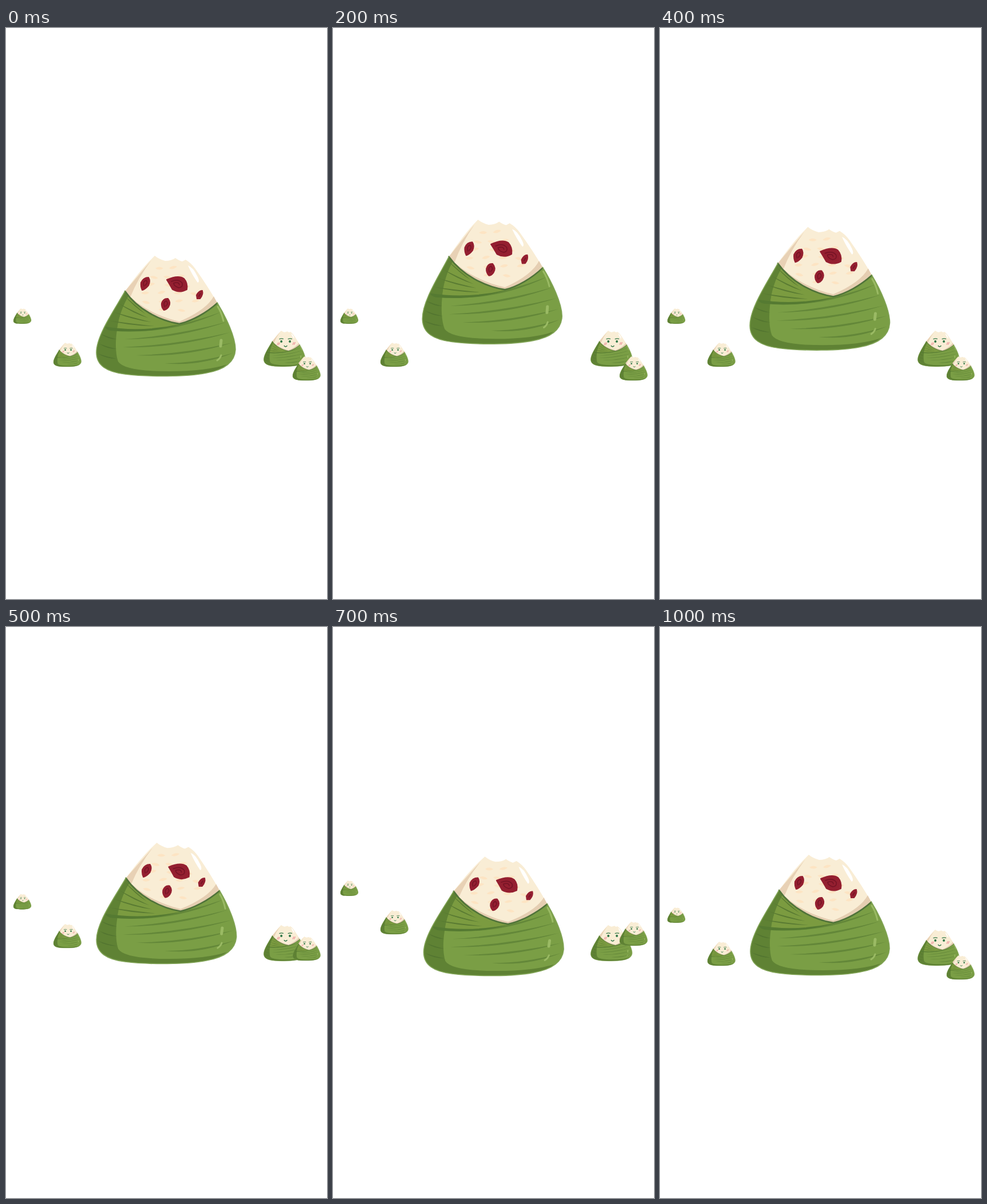
Animation, 561 px wide and 998 px high, one loop 1400 ms. Source, as an HTML page:

```html
<!DOCTYPE html>
<html lang="en">
<head>
<meta charset="utf-8">
<title>Hopping rice dumplings</title>
<style>
  html, body { margin: 0; width: 100%; height: 100%; overflow: hidden; background: #fff; }
  svg { display: block; width: 100%; height: 100%; }
</style>
</head>
<body>
<svg id="stage" viewBox="0 0 561 998"></svg>
<script>
const SVG = 'http://www.w3.org/2000/svg';
const LOOP = 1400, STEP = 100;
const BASE = 608, HEIGHT = 210, LEFT = 158, TOP = 398, MIDDLE = 280;

const range = n => [...Array(n).keys()];
const fill = (d, color) => ({ d, fill: color });
const line = (d, color, width) => ({
  d, fill: 'none', stroke: color, 'stroke-width': width, 'stroke-linecap': 'round', 'stroke-linejoin': 'round'
});

// A lens from (x1,y1) to (x2,y2) that sags in the middle.
function blade(x1, y1, x2, y2, sag, width) {
  const cx = (x1 + x2) / 2, cy = (y1 + y2) / 2 + sag;
  return `M${x1},${y1} Q${cx},${cy - width} ${x2},${y2} Q${cx},${cy + width} ${x1},${y1} Z`;
}

const leftEdge = 'M208,460 C190,492 158,537 158,567';
const outline = `${leftEdge} C158,590 176,601 208,605 C250,610 315,610 350,603 ` +
  'C384,597 400,583 401,562 C401,540 385,506 369,480';
const neckline = 'C350,498 325,512 303,517 C269,512 229,491 208,460';
const leaf = `${outline} ${neckline} Z`;
const rice = 'M208,460 C224,438 241,416 260,398 Q267,404 278,407 Q289,407 296,402 Q303,407 308,408 ' +
  `L314,405 Q324,411 331,421 Q353,452 369,480 ${neckline} Z`;

const veins = range(5).map(i => fill(blade(
  377 + 20 * Math.sin(i * 0.42), 496 + 18 * i, 202 + 13 * (i - 1.6) ** 2, 530 + 14 * i, 12, 3.2), '#638739'));
const foldVeins = range(4).map(i => fill(blade(
  205 - 9 * i, 466 + 15 * i, 244 + 5 * i, 500 + 7 * i, 3, 2.2), '#597a32'));
const shadeVeins = range(3).map(i => fill(blade(
  166 - 3 * i, 535 + 17 * i, 193, 544 + 17 * i, 3, 1.8), '#527430'));

const body = [
  fill(rice, '#f9edd5'),
  fill('M254,406 L208,460 L217,471 Q231,436 254,406 Z', '#e8d1b5'),
  fill(`M208,460 L369,480 ${neckline} C231,487 268,505 303,513 Q350,493 363,469 L369,480 ${neckline} Z`.replace('L369,480 C', 'M369,480 C'), '#e5ceb2'),
  fill('M318,415 Q327,418 335,435 Q339,444 335,445 Q325,431 318,415 Z', '#ffffff'),
  fill(leaf, '#7a9e45'),
  fill(`${leftEdge} C158,590 176,601 208,605 C250,610 315,610 350,603 Q374,598 386,588 ` +
    'Q350,600 285,600 Q207,600 196,583 C187,558 193,503 214,469 Z', '#5f8234'),
  fill('M214,469 Q250,508 303,518 Q246,533 194,529 Q196,501 214,469 Z', '#7b9b40'),
  ...veins, ...foldVeins, ...shadeVeins,
  fill('M303,518 Q236,532 173,522 Q174,527 183,529 Q250,535 303,518 Z', '#557a32'),
  line(`M369,481 ${neckline}`, '#50733a', 2.6),
  line(outline, '#81a456', 1.6),
  line('M370,487 Q377,498 380,512', '#9aba64', 3),
  line('M376,546 L375,556', '#9aba64', 5),
  line('M376,572 Q374,578 369,581', '#9aba64', 3)
];
body[2] = fill(`M369,480 ${neckline} C231,487 268,505 303,513 Q350,493 363,469 Z`, '#e5ceb2');

// Staggered rows of grains, each row as wide as the rice at that height.
const grains = range(6).flatMap(row => {
  const y = 420 + 14.5 * row;
  const half = Math.min(24 + 11 * row, (512 - y) * 1.7);
  const count = Math.max(2, Math.round(half / 14));
  return range(count).map(i => {
    const x = MIDDLE + 2 * row - half + 2 * half * (i + 0.5) / count;
    const dy = 3 * Math.sin(5 * i + 2 * row);
    return fill(blade(x - 7, y, x + 7, y + dy, 0, 5), '#fde4c3');
  });
});

const seed = (d, mark) => [
  { ...line(d, '#941f30', 2), fill: '#941f30' },
  line(mark, '#741325', 1.5)
];
const seeds = [
  ...seed('M281,440 Q301,431 311,438 Q318,446 316,457 Q303,464 291,457 Q286,448 281,440 Z',
    'M289,443 Q302,438 308,446 Q310,453 302,454 Q293,451 293,446 Q302,443 303,449'),
  ...seed('M236,445 Q240,436 249,436 Q253,442 249,450 Q243,457 238,458 Q235,452 236,445 Z',
    'M241,451 Q238,443 245,441 Q249,445 243,450'),
  ...seed('M272,481 Q275,472 283,473 Q289,480 284,488 Q280,493 276,493 Q271,488 272,481 Z',
    'M277,487 Q274,479 280,477 Q285,482 279,486'),
  ...seed('M333,467 Q337,459 343,459 Q345,466 339,473 L334,473 Z', 'M337,469 L340,464')
];

const GREEN = '#307747';
const eye = x => line(`M${x},461 L${x},462`, GREEN, 13);
const brow = x => line(`M${x - 11},447 Q${x},443 ${x + 11},446`, GREEN, 4);
const blush = (x, y) => [0, 8].map(dx => line(`M${x + dx - 3},${y + 6} L${x + dx + 3},${y - 6}`, '#eea4a3', 5));
const face = [
  eye(261), eye(311), brow(261), brow(312),
  line('M278,487 Q286,497 294,487', GREEN, 5),
  ...blush(240, 475), ...blush(331, 473)
];

function add(parent, tag, attrs = {}) {
  const node = document.createElementNS(SVG, tag);
  for (const name in attrs) node.setAttribute(name, attrs[name]);
  return parent.appendChild(node);
}

const stage = document.getElementById('stage');
const big = add(stage, 'g');
const bigParts = [...body, ...grains, ...seeds].map(part => ({ d: part.d, node: add(big, 'path', part) }));

const small = [
  { x: 13, y: 490, scale: 0.128, lift: 47, sag: 0 },
  { x: 83, y: 550, scale: 0.2, lift: 62, sag: 14 },
  { x: 450.5, y: 529, scale: 0.298, lift: 16, sag: 16 },
  { x: 501, y: 574, scale: 0.2, lift: 66, sag: 14 }
].map(dumpling => {
  const node = add(stage, 'g');
  [...body, ...face].forEach(part => add(node, 'path', part));
  return { ...dumpling, node };
});

const ramp = (step, from, to) => Math.min(1, Math.max(0, (step - from) / (to - from)));

// One hop: quick rise, steady fall, then a leaning rest that straightens up.
function hop(step) {
  const rise = 1 - (1 - ramp(step, 0, 3)) ** 1.35;
  const fall = ramp(step, 3, 6);
  const rest = 1 - ramp(step, 8, 10);
  const up = rise * (1 - fall) ** 1.15;
  const lean = rest * (1.75 * Math.sin(fall * Math.PI / 2) - rise);
  return {
    drop: rest * fall - 73 * up,
    tilt: 8 * lean,
    spread: 0.027 * rise * rest,
    stretch: 2.5 * fall * rest - 9 * up,
    roll: 2.5 * lean
  };
}

// Bends a path more strongly the further it lies above the base.
function warp(d, { drop, tilt, spread, stretch, roll }) {
  return d.replace(/([\d.]+),([\d.]+)/g, (_, px, py) => {
    const x = +px, y = +py, h = (BASE - y) / HEIGHT, side = x - MIDDLE;
    const wx = x + h * (tilt + spread * side);
    const wy = y + drop + h * (stretch + roll * side / 100);
    return `${wx.toFixed(2)},${wy.toFixed(2)}`;
  });
}

function draw(time) {
  const step = Math.floor(time % LOOP / STEP);
  const pose = hop(step);
  bigParts.forEach(({ d, node }) => node.setAttribute('d', warp(d, pose)));
  small.forEach(({ node, x, y, scale, lift, sag }) => {
    const height = (lift * ramp(step, 4, 6) - sag * ramp(step, 6, 8)) - (lift - sag) * ramp(step, 8, 10);
    node.setAttribute('transform',
      `translate(${x} ${y - height}) scale(${scale}) translate(${-LEFT} ${-TOP})`);
  });
}

const start = performance.now();
function tick() {
  draw(performance.now() - start);
  requestAnimationFrame(tick);
}
tick();
</script>
</body>
</html>
```
